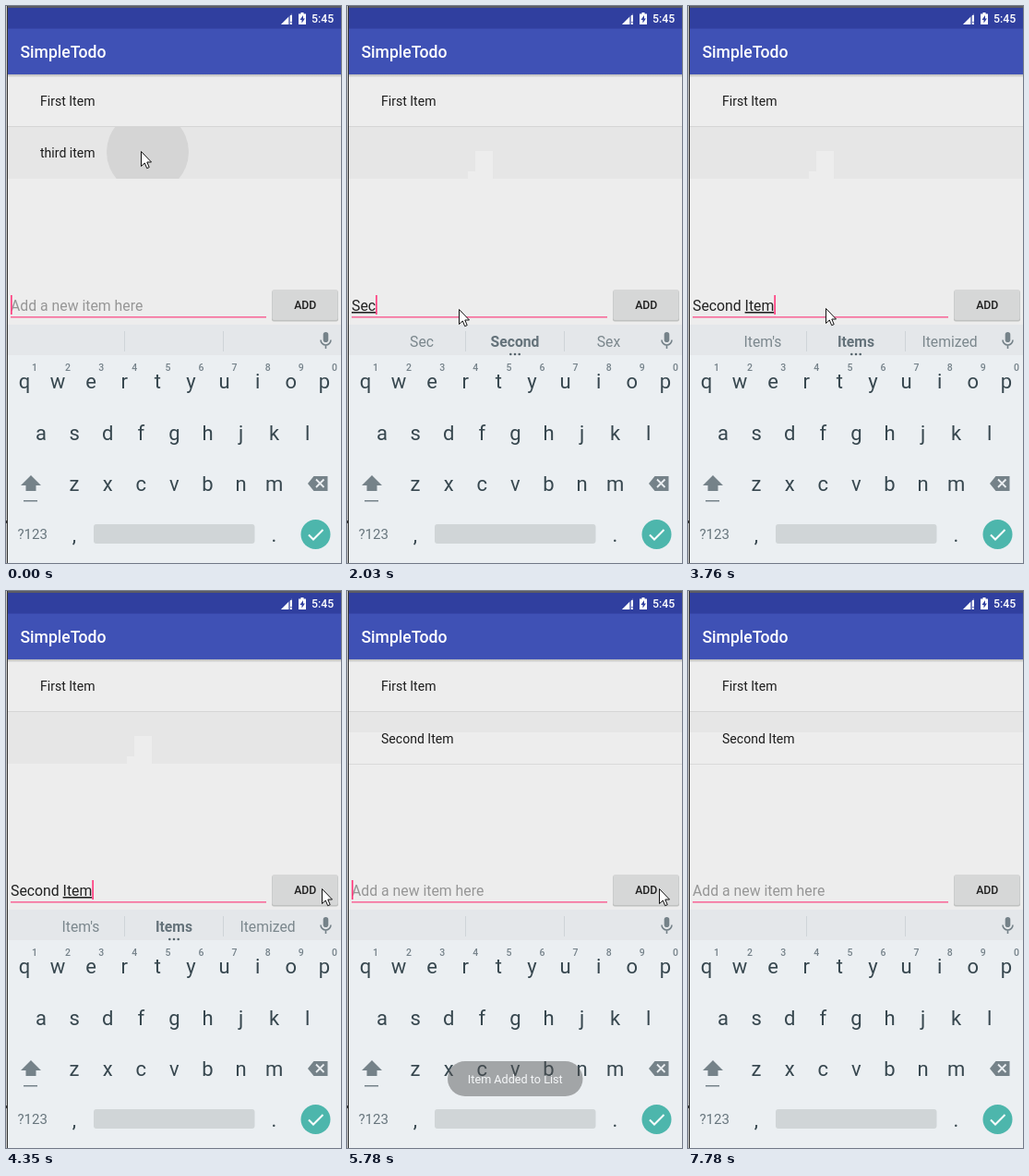
These frames come from a looping animation (363x603 px, 8000 ms). An HTML page:

```html
<!DOCTYPE html>
<html lang="en">
<head>
<meta charset="utf-8">
<style>
html, body { margin: 0; width: 100%; height: 100%; overflow: hidden; background: #ededed; }
svg { display: block; font-family: Roboto, sans-serif; }
text { white-space: pre; }
.mid { text-anchor: middle; }
.item { font-size: 14.05px; fill: #1c1c1c; }
.edit { font-size: 15.8px; fill: #222; }
.word { font-size: 15.7px; fill: #7b878d; text-anchor: middle; }
.key { font-size: 22px; fill: #37474f; text-anchor: middle; }
.num { font-size: 10.5px; font-weight: 500; fill: #75828a; text-anchor: middle; }
.icon { fill: #758289; }
</style>
</head>
<body>
<svg width="363" height="603" viewBox="0 0 363 603">
  <defs>
    <linearGradient id="shade" x2="0" y2="1">
      <stop stop-color="#b9b9b9"/><stop offset="1" stop-color="#ededed"/>
    </linearGradient>
    <clipPath id="row"><rect x="2" y="131" width="361" height="56"/></clipPath>
  </defs>
  <rect width="363" height="603" fill="#ededed"/>

  <!-- list -->
  <rect x="2" y="130" width="361" height="1" fill="#d5d5d5"/>
  <rect id="band" x="2" y="131" width="361" height="56" fill="#e6e6e6"/>
  <circle id="ripple" cx="153.5" cy="158" r="44.5" fill="#d5d5d5" clip-path="url(#row)"/>
  <path id="patch" d="M139 157h19v30h-27v-8h8z" fill="#ededed"/>
  <rect id="divider" x="2" y="187" width="361" height="1" fill="#dadada"/>
  <text class="item" x="37" y="107.5">First Item</text>
  <text class="item" id="third" x="37" y="164">third item</text>
  <text class="item" id="second" x="37" y="164.5">Second Item</text>

  <!-- bars -->
  <rect y="74" width="363" height="3.5" fill="url(#shade)"/>
  <rect y="24" width="363" height="50" fill="#3f51b5"/>
  <rect width="363" height="24.5" fill="#303f9f"/>
  <text x="15.5" y="56" font-size="17.57" font-weight="500" fill="#fff">SimpleTodo</text>
  <text x="331" y="18.3" font-size="12.3" font-weight="500" fill="#fff">5:45</text>
  <path d="M298 20L310 8V20z" fill="#fff" opacity=".35"/>
  <path d="M298 20L306 12V20zM308 10h2v7h-2zm0 8h2v2h-2z" fill="#fff"/>
  <path d="M319.5 7h3v1.5h2.5V20h-8V8.500h2.500z" fill="#fff"/>
  <path d="M322 10l-3.500 5h2v3.500l3.500-5h-2z" fill="#303f9f"/>

  <!-- entry row -->
  <rect x="5" y="336" width="277" height="1.6" fill="#f76c9b"/>
  <text class="edit" id="hint" x="5" y="330" style="fill:#969696">Add a new item here</text>
  <text class="edit" id="entry" x="5" y="330"><tspan id="done"></tspan><tspan id="current" text-decoration="underline"></tspan></text>
  <rect id="caret" y="313" width="1.7" height="21" fill="#ff4081"/>
  <rect x="288" y="308" width="72" height="33.500" rx="2" fill="#bfc1c0"/>
  <rect id="button" x="288.500" y="307" width="71" height="33" rx="2" fill="#d6d7d7"/>
  <text class="mid" x="324.300" y="327.500" font-size="12.3" font-weight="500" fill="#212121">ADD</text>

  <!-- keyboard -->
  <rect y="345" width="363" height="33" fill="#e4e7ea"/>
  <rect y="378" width="363" height="225" fill="#ebeff2"/>
  <path d="M128.500 352v22M235.500 352v22" stroke="#cfd4d8"/>
  <text class="word" x="81" y="368.500"></text>
  <text class="word" x="182" y="368.500" style="font-weight:700;fill:#64727a"></text>
  <text class="word" x="283.500" y="368.500"></text>
  <g id="dots" fill="#56646c">
    <circle cx="177.300" cy="377" r="1.3"/><circle cx="182" cy="377" r="1.3"/><circle cx="186.700" cy="377" r="1.3"/>
  </g>
  <rect class="icon" x="343.700" y="353" width="5.600" height="11" rx="2.800"/>
  <path d="M341 361.500a5.500 5.500 0 0 0 11 0M346.500 367v4" fill="none" stroke="#758289" stroke-width="1.6"/>
  <g id="keys"></g>
  <path class="icon" d="M27 508L38 519H32.500V525H21.500V519H16zM19 535h15v1.500H19z"/>
  <path class="icon" d="M327 517L333.500 509H348.500V525H333.500z"/>
  <path d="M336 512.500l8.500 8.500m0-8.500l-8.500 8.500" stroke="#ebeff2" stroke-width="1.8"/>
  <text x="12.500" y="577" font-size="15" fill="#67757d">?123</text>
  <rect x="95" y="561" width="174.500" height="21" rx="3" fill="#d0d5d7"/>
  <circle cx="335.500" cy="572" r="16" fill="#4db6ac"/>
  <path d="M328 572.500l5 5 10.500-10.500" fill="none" stroke="#fff" stroke-width="2"/>

  <g id="toast">
    <rect x="109" y="509" width="146.500" height="38" rx="19" fill="#4f5051" opacity=".93"/>
    <text class="mid" x="182.300" y="532.500" font-size="12.65" fill="#fff">Item Added to List</text>
  </g>
  <path d="M0 0h363v2H0z" fill="#5c5c64"/>
  <path d="M0 0h1v603H0z" fill="#c9c9c9"/>
  <path d="M1 0h1v603H1zM0 557h1v3H0z" fill="#333"/>
  <path id="mouse" d="M.5.500V16.500L4.300 13L6.700 18.700L9.200 17.600L6.800 12H11.500z" fill="#fff" stroke="#111"/>
</svg>
<script>
const LOOP = 8000, PHRASE = 'Second Item', CLEAR = 5590;
const $ = id => document.getElementById(id);
const words = document.querySelectorAll('.word');

// time, letters typed, suggestions
const typing = [
  [0, 0, '||'],
  [1460, 1, '||'],
  [1820, 2, 'See|Set|Send'],
  [1970, 3, 'Sec|Second|Sex'],
  [2120, 4, 'Seconds|Second|Sec'],
  [2270, 5, 'Seconds|Second|Son'],
  [2420, 6, 'Secondary|Second|Seconds'],
  [2590, 7, 'Secondary|Second|Seconds'],
  [2810, 8, 'Is|In|It'],
  [3060, 9, "It's|It|Its"],
  [3220, 10, 'Items|Item|Iter'],
  [3390, 11, "Item's|Items|Itemized"],
  [CLEAR, 0, '||']
];
const caretFlips = [0, 100, 500, 960, 1460, 3890, 4340, 4830, 5320, 5850, 6350, 6850, 7350, 7780];
// time, x, y
const mousePath = [
  [0, 146, 157], [780, 146, 157], [1050, 121, 307], [1280, 121, 328],
  [3730, 121, 328], [3980, 349, 321], [4230, 349, 321], [4350, 342, 322],
  [4460, 338, 322], [5830, 338, 322], [6070, 215, 500], [6200, 115, 552],
  [6350, 93, 519], [7250, 93, 519], [7400, 8, 515], [LOOP, 8, 515]
];

function addKeys(letters, x, y, cls) {
  $('keys').innerHTML += [...letters].map((c, i) =>
    `<text class="${cls}" x="${x + i * 36.1}" y="${y}">${c}</text>`).join('');
}
addKeys('qwertyuiop', 20, 414, 'key');
addKeys('1234567890', 31, 395, 'num');
addKeys('asdfghjkl', 38, 469.5, 'key');
addKeys('zxcvbnm', 74, 525, 'key');
addKeys(',', 74, 580, 'key');
addKeys('.', 290.5, 580, 'key');

const ramp = (t, a, b) => Math.min(1, Math.max(0, (t - a) / (b - a)));
const fade = (id, opacity) => $(id).style.opacity = opacity;

function mouseAt(t) {
  const i = mousePath.findIndex(p => p[0] > t);
  const [t0, x0, y0] = mousePath[i - 1], [t1, x1, y1] = mousePath[i];
  const k = ramp(t, t0, t1);
  return [x0 + (x1 - x0) * k, y0 + (y1 - y0) * k].map(Math.round);
}

function draw(now) {
  const t = now % LOOP, added = t >= CLEAR;

  fade('third', 1 - ramp(t, 50, 130));
  fade('ripple', +(t < 350));
  fade('patch', +(t >= 820 && !added));
  fade('second', +added);
  fade('divider', +added);
  $('band').setAttribute('height', added ? 22 : 56);

  const [, count, guesses] = typing.findLast(s => s[0] <= t);
  const split = count > 6 ? 7 : 0;
  $('done').textContent = PHRASE.slice(0, Math.min(split, count));
  $('current').textContent = PHRASE.slice(split, count);
  fade('hint', count ? (t < 1670 ? .35 : 0) : 1);
  guesses.split('|').forEach((g, i) => words[i].textContent = g);
  fade('dots', +(guesses !== '||'));

  $('caret').setAttribute('x', 5 + (count ? $('entry').getComputedTextLength() : 0));
  fade('caret', caretFlips.filter(f => f <= t).length % 2);
  $('button').setAttribute('fill', t >= 5320 && t < 5700 ? '#cbcccc' : '#d6d7d7');
  fade('toast', ramp(t, 5620, 5940) * (1 - ramp(t, 7250, 7770)));

  $('mouse').setAttribute('transform', `translate(${mouseAt(t)})`);
  fade('mouse', +(t < 7400));
}

const start = performance.now();
(function tick() {
  draw(performance.now() - start);
  requestAnimationFrame(tick);
})();
</script>
</body>
</html>
```
